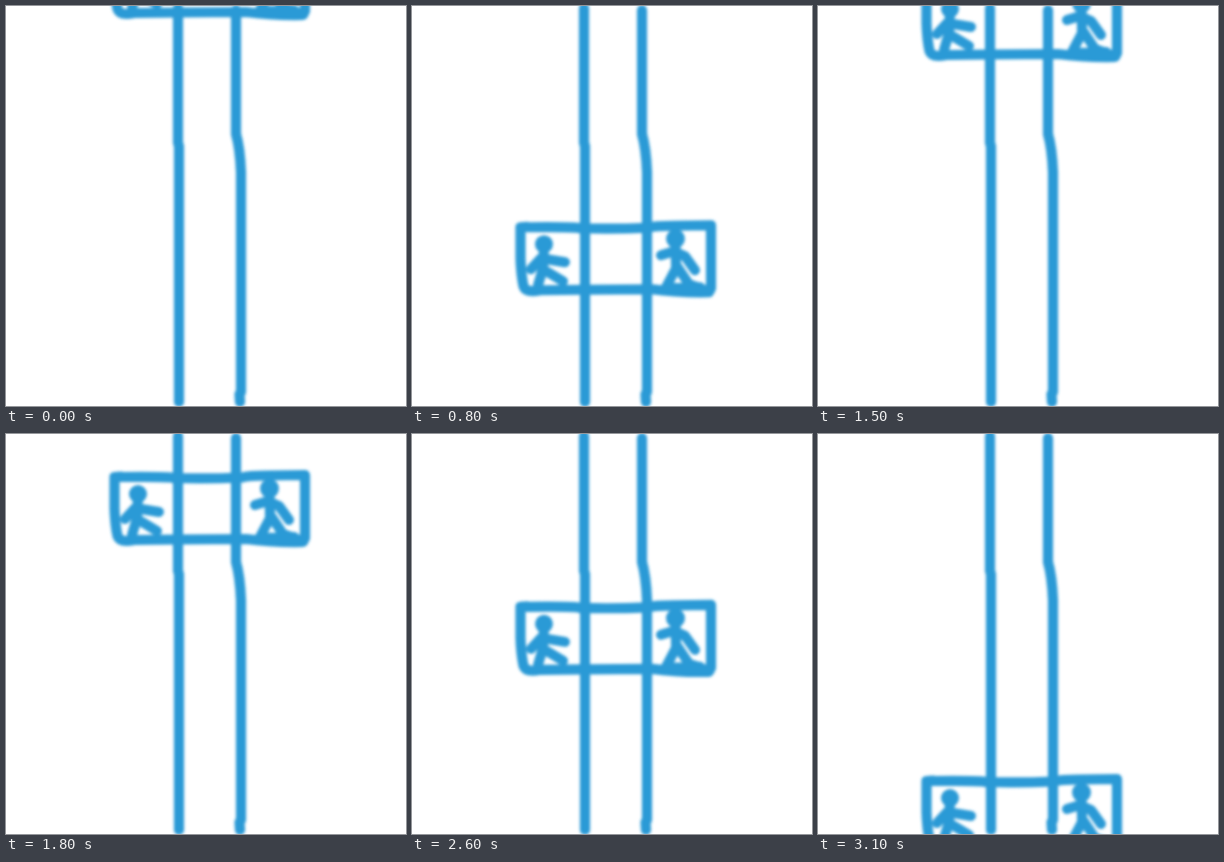
Write an HTML page that moves like this. It is 400 px wide and 400 px high and loops after 3200 ms.

```html
<!DOCTYPE html>
<html lang="en">
<head>
<meta charset="utf-8">
<title>Crossing sign</title>
<style>
  html, body { margin: 0; width: 100%; height: 100%; overflow: hidden; background: #fff; }
  svg { display: block; width: 100vw; height: 100vh; }
  .ink { fill: none; stroke: #2b9ad6; stroke-width: 10.2; stroke-linecap: round; stroke-linejoin: round; }
  .figure { stroke-width: 10; }
  .head { fill: #2b9ad6; stroke: none; }
</style>
</head>
<body>
<svg viewBox="0 0 400 400">
  <filter id="soft" filterUnits="userSpaceOnUse" x="-10" y="-10" width="420" height="420">
    <feGaussianBlur stdDeviation="1.8"/>
  </filter>
  <g class="ink" filter="url(#soft)">
    <path d="M172 2V137L173 140V396"/>
    <path d="M230 4V128Q234 142 235 166V386M233.5 388L234 396"/>
    <g id="sign">
      <path d="M115 6.500L108.500 7V38Q109 54 111.500 66Q114 73 128 70L172 69.500L240 69Q264 72.500 297 72L299 68V5L262 5.500Q242 5.500 236 7.500Q200 9 168 8Q163 6.500 115 7"/>
      <g class="figure">
        <circle class="head" cx="132" cy="24" r="9"/>
        <path d="M132 26L131 48L126 65M119 49L129 38L153 42M131 49L151 61"/>
        <circle class="head" cx="263.500" cy="18.500" r="9.500"/>
        <path d="M263.500 22L264 48L254 67M249 35L262 31L273 36L283 50M265 46L277 64L291 69M257 68L288 67"/>
      </g>
    </g>
  </g>
</svg>
<script>
  const LOOP = 3200;
  const AWAY = 500;

  // Straight moves between key points, drawn in coarse ticks.
  const moves = [
    { start: 0, end: 400, from: -63, to: 0 },
    { start: 400, end: 1000, from: 0, to: 313, ease: u => u * (1.08 - 0.08 * u) },
    { start: 1400, end: 1900, from: -40, to: 55 },
    { start: 1900, end: 2300, from: 55, to: 96, tick: 200, ease: u => u * (1.44 - 0.44 * u) },
    { start: 2500, end: 3100, from: 131, to: 340 }
  ];

  function shiftAt(time) {
    const move = moves.findLast(m => time >= m.start);
    const { start, end, from, to, tick = 100, ease = u => u } = move;
    if (end === 1000 && time > end) return AWAY;
    const u = Math.min(1, Math.floor((time - start) / tick) * tick / (end - start));
    return from + (to - from) * ease(u);
  }

  const sign = document.getElementById('sign');
  const begin = performance.now();

  function draw(now) {
    const time = Math.max(0, now - begin) % LOOP;
    const shown = Math.floor(time / 100) * 100;
    sign.setAttribute('transform', `translate(0 ${shiftAt(shown)})`);
    requestAnimationFrame(draw);
  }
  draw(begin);
</script>
</body>
</html>
```
